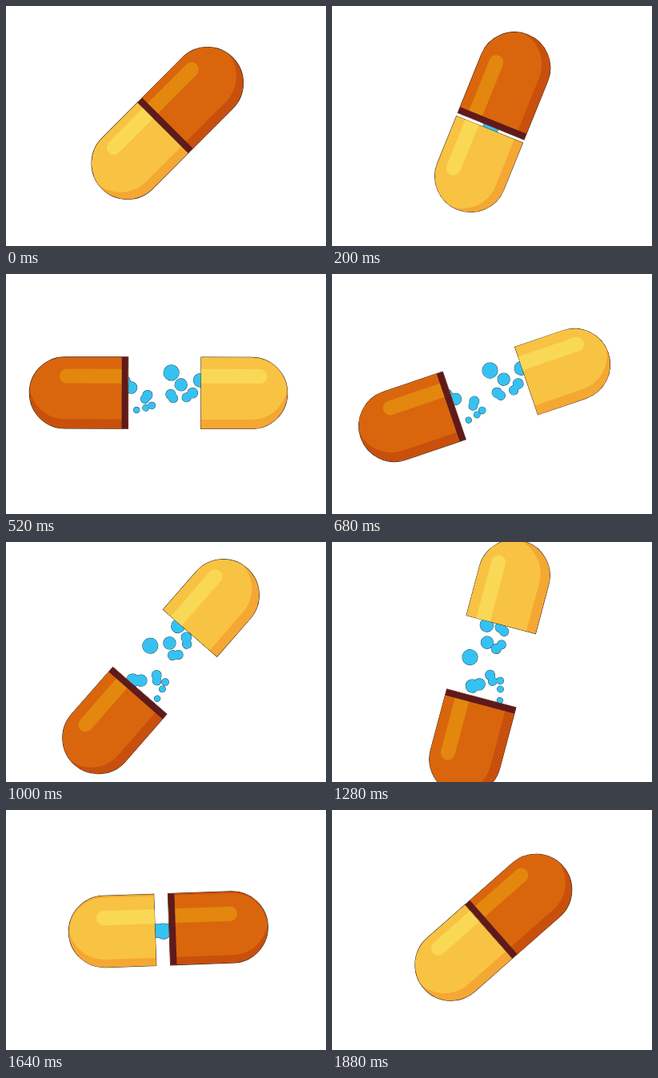
Animation of 400 by 300 pixels, one loop 1920 ms. Source, as an HTML page with a canvas:

```html
<!DOCTYPE html>
<html>
<head>
<meta charset="utf-8">
<style>
html, body { margin: 0; width: 100%; height: 100%; overflow: hidden; background: #fff; }
canvas { display: block; }
</style>
</head>
<body>
<canvas id="stage" width="400" height="300"></canvas>
<script>
const ctx = document.getElementById('stage').getContext('2d');
const LOOP = 1920, R = 44.7, GAP = 95.5, TAU = Math.PI * 2;

const orange = { len: 78.7, band: 8, reach: 0, base: '#d9660c', light: '#e3870f', dark: '#c94f0c' };
const yellow = { len: 63.2, band: 0, reach: 13, base: '#f8c342', light: '#f9d856', dark: '#f5a733' };

// Where the balls float, along and across the axis, while the capsule is open
const balls = [
  [-5, 27], [-46, 17], [-23, 11], [-14, -2], [-19, -7], [-42, 0], [-36, -6],
  [17, -17], [18, -3], [23, -8], [26, -20], [39, -23], [43, 15], [36, 7]
];

const clamp = (x, min, max) => Math.min(max, Math.max(min, x));
const mix = (a, b, k) => a + (b - a) * k;
const ease = x => x < 0.5 ? 4 * x ** 3 : 1 - 4 * (1 - x) ** 3;
const pulse = (t, start) => ease(clamp((t - start) / 580, 0, 1));

// Half capsule: flat cut at x = 0, round end to the right, shifted sideways by dy
function shell(len, dy = 0) {
  ctx.beginPath();
  ctx.moveTo(0, dy - R);
  ctx.arc(len, dy, R, -Math.PI / 2, Math.PI / 2);
  ctx.lineTo(0, dy + R);
  ctx.closePath();
}

function drawHalf(half, x, flip, open) {
  ctx.save();
  ctx.translate(x, 0);
  ctx.scale(flip, 1);
  shell(half.len);
  ctx.strokeStyle = '#2a2018';
  ctx.lineWidth = 1;
  ctx.stroke();
  ctx.fillStyle = half.dark;
  ctx.fill();
  ctx.clip();

  // The light slides from one side to the other as the capsule opens
  ctx.save();
  shell(half.len, -12 * (1 - open));
  ctx.clip();
  shell(half.len, 12 * open);
  ctx.fillStyle = half.base;
  ctx.fill();
  ctx.restore();

  const y = mix(-26, 23, open);
  ctx.beginPath();
  ctx.moveTo(-12, y);
  ctx.lineTo(half.len - 2 + half.reach * open, y);
  ctx.lineCap = 'round';
  ctx.lineWidth = 18;
  ctx.strokeStyle = half.light;
  ctx.stroke();

  ctx.fillStyle = '#5e1a1c';
  ctx.fillRect(0, -R, half.band, 2 * R);
  ctx.restore();
}

// Each cluster shears slowly; balls are larger towards one side
function drawBalls(t, open) {
  const drift = clamp((t - 980) / 300, -1, 1) / 3;
  const path = new Path2D();
  for (const [along, across] of balls) {
    const side = along < 0 ? 1 : -1;
    const u = (along + drift * (side * across - 11)) * open;
    const v = across * open ** 1.5;
    const r = 6.3 + 0.12 * across;
    path.moveTo(u + r, v);
    path.arc(u, v, r, 0, TAU);
  }
  ctx.strokeStyle = '#1c4250';
  ctx.lineWidth = 1;
  ctx.stroke(path);
  ctx.fillStyle = '#35c2f3';
  ctx.fill(path);
}

function draw(t) {
  const first = pulse(t, 70), second = pulse(t, 1270);
  const open = first - second;
  const turn = 180 * t / LOOP + 90 * (first + second);
  const sway = 2 * Math.cos(TAU * (t - 320) / LOOP);

  ctx.fillStyle = '#fff';
  ctx.fillRect(0, 0, 400, 300);
  ctx.save();
  ctx.translate(196.7, 150.2);
  ctx.rotate(-(45 + turn) * Math.PI / 180);
  ctx.translate(0, sway);
  if (open > 0.001) drawBalls(t, open);
  const shift = open * GAP / 2;
  drawHalf(yellow, -1.5 - shift, -1, open);
  drawHalf(orange, -1.6 + shift, 1, open);
  ctx.restore();
}

const start = performance.now();
function tick() {
  draw((performance.now() - start) % LOOP);
  requestAnimationFrame(tick);
}
tick();
</script>
</body>
</html>
```
